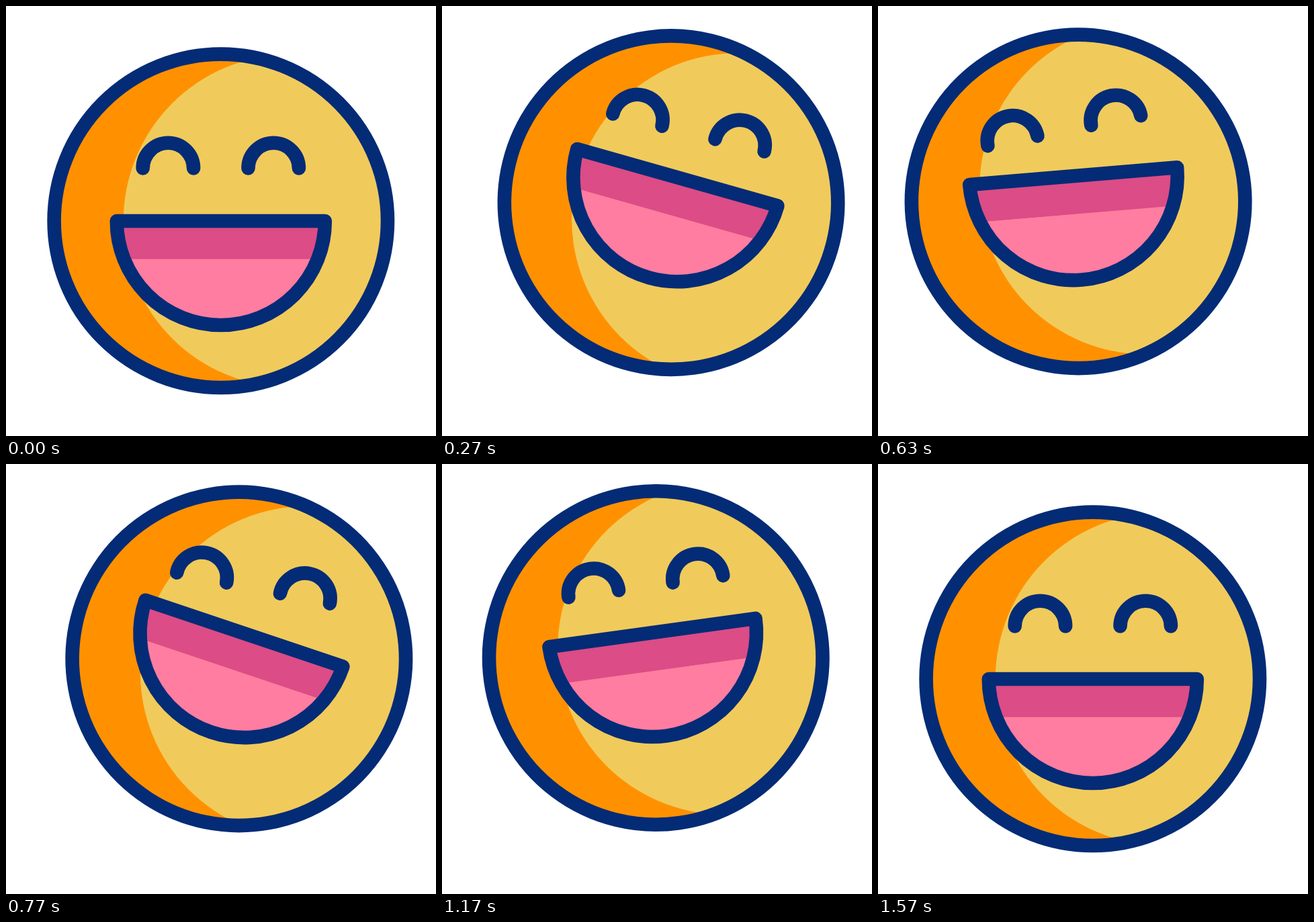
Recreate the animation shown at these times as an HTML page with a canvas. Size 640 px wide and 640 px high, loop 2000 ms.

```html
<!DOCTYPE html>
<html lang="en">
<head>
<meta charset="utf-8">
<title>Laughing face</title>
<style>
  html, body { margin: 0; width: 100%; height: 100%; overflow: hidden; background: #fff; }
  canvas { display: block; width: 640px; height: 640px; }
</style>
</head>
<body>
<canvas id="stage" width="640" height="640"></canvas>
<script>
const ctx = document.getElementById('stage').getContext('2d');
const LOOP = 2000, FPS = 30, REST = 47, CENTER = 319.8;
const NAVY = '#042b76', ORANGE = '#ff9100', YELLOW = '#f0cb5b';
const DARK_PINK = '#dc4c86', PINK = '#ff7da0';

// Turning points of the sway: step and sideways reach.
const turns = [[0, 0], [8.5, 21.5], [17.5, -31.5], [23.3, 27.5], [30.2, -32.5], [40, 31.4], [REST, 0]];

// Smooth 0 to 1 between two steps.
function ease(step, from, to) {
  const p = Math.min(1, Math.max(0, (step - from) / (to - from)));
  return p * p * (3 - 2 * p);
}

// Rises until `top`, then falls back between `leave` and `end`.
const pulse = (step, start, top, leave, end) => ease(step, start, top) - ease(step, leave, end);

function swayAt(step) {
  let x = 0;
  for (let i = 1; i < turns.length; i++) {
    const [from, a] = turns[i - 1], [to, b] = turns[i];
    x += (b - a) * ease(step, from, to);
  }
  return x;
}

const rotate = degrees => ctx.rotate(degrees * Math.PI / 180);

function disc(x, y, r, color) {
  ctx.beginPath();
  ctx.arc(x, y, r, 0, Math.PI * 2);
  ctx.fillStyle = color;
  ctx.fill();
}

function drawHead() {
  disc(0, 0, 248, ORANGE);
  ctx.save();
  ctx.clip();
  disc(102.3, 0, 247.3, YELLOW);
  ctx.restore();
  ctx.beginPath();
  ctx.arc(0, 0, 248.2, 0, Math.PI * 2);
  ctx.stroke();
}

function drawEye(x, y) {
  ctx.beginPath();
  ctx.arc(x, y, 37.7, Math.PI, 0);
  ctx.stroke();
}

function drawMouth(y, tilt) {
  ctx.save();
  ctx.translate(0, y);
  rotate(tilt);
  const shape = new Path2D();
  shape.arc(0, 0, 155, 0, Math.PI);
  shape.closePath();
  ctx.save();
  ctx.clip(shape);
  ctx.fillStyle = DARK_PINK;
  ctx.fillRect(-160, 0, 320, 57);
  ctx.fillStyle = PINK;
  ctx.fillRect(-160, 56.7, 320, 105);
  ctx.restore();
  ctx.stroke(shape);
  ctx.restore();
}

function draw(now) {
  const step = Math.min(REST, Math.floor((now % LOOP + 4) * FPS / 1000));
  const sway = swayAt(step);
  const hop = pulse(step, 0, 8, 40, REST);
  const float = pulse(step, 8, 34, 34, 40);
  const lean = hop * (3.65 - 12.5 * ease(step, 4, 44));
  const eyesY = -78.3 - 29 * pulse(step, 0, 8, 36, REST);
  const mouthY = 0.2 - 38.7 * pulse(step, 0, 8, 34, REST);
  const mouthTilt = 7.2 * pulse(step, 0, 24, 24, 36);

  ctx.fillStyle = '#fff';
  ctx.fillRect(0, 0, 640, 640);
  ctx.save();
  ctx.translate(CENTER + sway, CENTER - 27.2 * hop - 4.4 * float);
  rotate(sway / 2 + lean);
  ctx.strokeStyle = NAVY;
  ctx.lineWidth = 20.6;
  ctx.lineCap = ctx.lineJoin = 'round';
  drawHead();
  drawEye(-78.4, eyesY);
  drawEye(78.4, eyesY);
  drawMouth(mouthY, mouthTilt);
  ctx.restore();
}

const start = performance.now();
function tick() {
  draw(performance.now() - start);
  requestAnimationFrame(tick);
}
tick();
</script>
</body>
</html>
```
